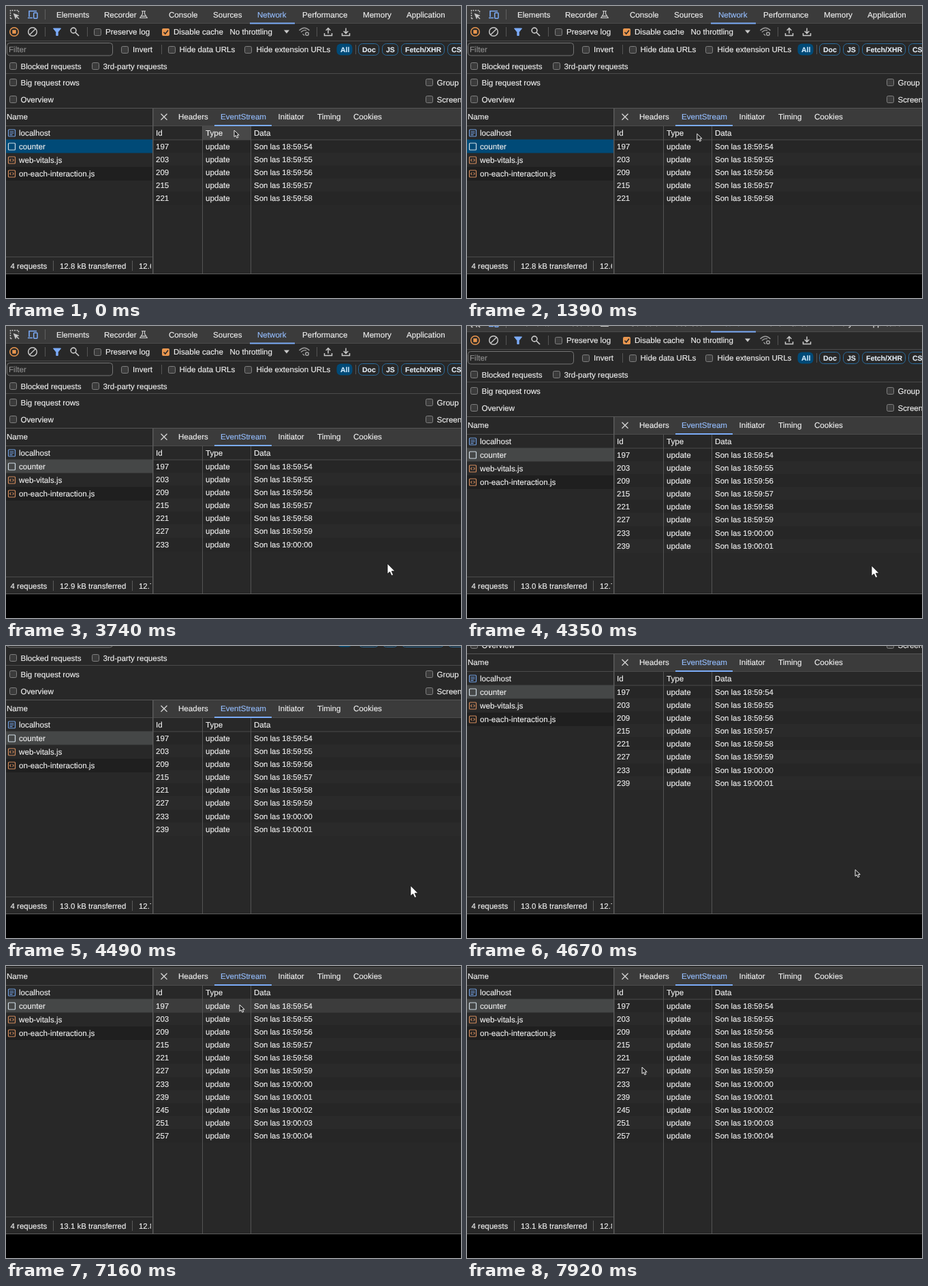
These frames come from a looping animation (668 by 430 pixels, 7990 ms). An HTML page:

```html
<!DOCTYPE html>
<html lang="en">
<head>
<meta charset="utf-8">
<title>Network event stream</title>
<style>
html, body { margin: 0; width: 100%; height: 100%; overflow: hidden; background: #000; }
svg { display: block; }
text { font-family: "Liberation Sans", Arial, sans-serif; text-rendering: geometricPrecision; white-space: pre; }
</style>
</head>
<body>
<svg id="stage" width="668" height="430" viewBox="0 0 668 430"></svg>
<script>
const LOOP = 7990;
const BG = '#282828', BAR = '#3b3b3b', LINE = '#4b4b4b', TEXT = '#efefef';
const BLUE = '#7cacf8', ACTIVE = '#93bbfa', ORANGE = '#e8964f', ICON = '#c9c9c9';
const ROW_H = 19.1, SCROLL = 148;

const rect = (x, y, w, h, fill, extra = '') =>
  `<rect x="${x}" y="${y}" width="${w}" height="${h}" fill="${fill}" ${extra}/>`;
const label = (x, mid, str, fill = TEXT, size = 11.6, extra = '') =>
  `<text x="${x}" y="${mid + 4}" fill="${fill}" stroke="${fill}" stroke-width=".15" font-size="${size}" ${extra}>${str}</text>`;
const path = (d, stroke = ICON, width = 1.3, fill = 'none') =>
  `<path d="${d}" stroke="${stroke}" stroke-width="${width}" fill="${fill}"/>`;
const hline = (x, y, w, fill = LINE) => rect(x, y, w, 1, fill);
const vline = (x, y, h, fill = LINE) => rect(x, y, 1, h, fill);

function checkbox(x, mid, str, gap = 16.5) {
  return rect(Math.floor(x) + .5, Math.floor(mid) - 4.5, 10, 10, '#3b3b3b', 'rx="2" stroke="#808080"') +
    label(x + gap, mid, str);
}

function pill(x, w, str, active) {
  const style = active ? '' : 'stroke="#2b6c9c"';
  return rect(x + .5, 55.5, w, 17, active ? '#004a77' : BG, `rx="6" ${style}`) +
    label(x + 6, 64, str, active ? '#d3ecff' : '#dfe9f2', 10.5, 'font-weight="bold"');
}

function topTabs() {
  const tabs = [[74, 'Elements'], [144, 'Recorder'], [239, 'Console'], [304, 'Sources'], [369, 'Network'],
    [435, 'Performance'], [524, 'Memory'], [588, 'Application']];
  return rect(0, 0, 668, 25, BAR) + hline(0, 25, 668) +
    tabs.map(([x, s]) => label(x, 13, s, s === 'Network' ? ACTIVE : TEXT)).join('') +
    rect(358, 24.5, 66, 2, BLUE) + vline(57, 5, 15, '#606060') +
    path('M6.5 18.5V6.5H18.5V11M6.5 18.5H10', ICON, 1.4).replace('/>', ' stroke-dasharray="2 1.5"/>') +
    path('M11 11L19 14L15.5 15.5L14 19Z', ICON, .5, ICON) + path('M15 15L19 19', ICON, 1.5) +
    path('M34 16V7.5H45M32 17.5H39', BLUE, 1.6) + rect(40.7, 10, 5.3, 8.3, 'none', `rx="1" stroke="${BLUE}" stroke-width="1.5"`) +
    path('M199 7.5H205M200.5 8V11.5L196.8 17.5H207.2L203.5 11.5V8', ICON, 1.2) + path('M199 15H205', ICON, 1.5);
}

function toolbar() {
  const tray = (x, arrow) => path(`M${x - 5.5} 40V43.5H${x + 5.5}V40M${x} 32.5V40.5${arrow}`, ICON, 1.5);
  return hline(0, 51, 668) + [57, 119, 456].map(x => vline(x, 31, 14, '#555')).join('') +
    `<circle cx="12" cy="38" r="6.3" fill="none" stroke="${ORANGE}" stroke-width="1.5"/>` + rect(9.3, 35.3, 5.4, 5.4, ORANGE) +
    `<circle cx="39" cy="38" r="6.3" fill="none" stroke="${ICON}" stroke-width="1.5"/>` + path('M34.5 42.5L43.5 33.5', ICON, 1.5) +
    path('M69.5 33H80.5L76.2 38.5V43.5H73.8V38.5Z', BLUE, 1, BLUE) +
    `<circle cx="99" cy="36" r="3.9" fill="none" stroke="${ICON}" stroke-width="1.6"/>` + path('M102 39L107 44', ICON, 1.7) +
    checkbox(129, 38, 'Preserve log', 17) +
    rect(229, 33, 11, 11, ORANGE, 'rx="2"') + path('M231.5 38.5L233.8 41L238 35.8', '#282828', 1.6) +
    label(246, 38, 'Disable cache') + label(328.5, 38, 'No throttling') +
    path('M408 35.5H416L412 40.5Z', 'none', 0, ICON) +
    path('M430.5 36Q438 28.5 445.5 36M433 38.5Q437 34.5 441 36M435.5 41L438 43.5', '#9b9b9b', 1.4) +
    '<circle cx="442" cy="41" r="2.3" fill="none" stroke="#9b9b9b" stroke-width="1.6"/>' +
    tray(473, 'M469.7 36L473 32.6L476.3 36') + tray(499, 'M495.7 37L499 40.4L502.3 37');
}

function filters() {
  return rect(1.5, 54.5, 155, 18.5, BG, 'rx="4" stroke="#747474"') + label(4, 64, 'Filter', '#8d8d8d') +
    checkbox(169, 64, 'Invert', 17) + vline(228, 57, 14, '#555') +
    checkbox(238, 64, 'Hide data URLs') + checkbox(350.5, 64, 'Hide extension URLs', 17) +
    pill(485, 23, 'All', true) + vline(513, 57, 14, '#555') +
    pill(517, 30, 'Doc') + pill(552, 23, 'JS') + pill(580, 63, 'Fetch/XHR') + pill(648, 36, 'CSS') +
    checkbox(5, 88.5, 'Blocked requests') + checkbox(126, 88.5, '3rd-party requests') + hline(0, 99, 668) +
    checkbox(5, 112.5, 'Big request rows') + checkbox(5, 137.5, 'Overview') +
    checkbox(616, 112.5, 'Group by frame') + checkbox(616, 137.5, 'Screenshots') + hline(0, 150, 668, '#555');
}

function requestList() {
  const names = ['localhost', 'counter', 'web-vitals.js', 'on-each-interaction.js'];
  const docBlue = '#6f9ddf', scriptOrange = '#d08a5c';
  const box = (mid, color) => rect(3.5, mid - 5, 10, 10, 'none', `rx="1" stroke="${color}" stroke-width="1.2"`);
  const icons = [
    m => box(m, docBlue) + path(`M5.5 ${m - 2}H11.5M5.5 ${m + .3}H11.5M5.5 ${m + 2.6}H9.5`, docBlue, 1.1),
    m => box(m, '#d0dbe4'),
    m => box(m, scriptOrange) +
      path(`M7.5 ${m - 2}L5.7 ${m}L7.5 ${m + 2}M9.5 ${m - 2}L11.3 ${m}L9.5 ${m + 2}`, scriptOrange, 1.1)
  ];
  return label(1, 163, 'Name') + hline(0, 176, 215) + rect(0, 237, 215, 20, '#1f1f1f') +
    '<rect id="selected" y="196.5" width="215" height="20"/>' +
    names.map((n, i) => icons[Math.min(i, 2)](187 + i * 20) + label(19, 187 + i * 20, n, TEXT, 11.65)).join('');
}

function streamRow(i) {
  const mid = Math.round(206.9 + i * ROW_H), s = 54 + i;
  const clock = s < 60 ? '18:59:' + s : '19:00:' + String(s - 60).padStart(2, '0');
  return `<g class="row">${rect(217, mid - 10, 451, 20, i % 2 ? '#2a2a2a' : '#262626')}` +
    label(220, mid, 197 + 6 * i, TEXT, 11.5) + label(293, mid, 'update', TEXT, 11.7) +
    label(364, mid, 'Son las ' + clock, TEXT, 11.45) + '</g>';
}

function streamPane() {
  const tabs = [[253, 'Headers'], [315, 'EventStream'], [399.5, 'Initiator'], [457, 'Timing'], [510, 'Cookies']];
  const rows = Array.from({ length: 11 }, (_, i) => streamRow(i)).join('');
  return rect(216, 151, 452, 25, BAR) + hline(216, 176, 452) +
    path('M227.5 158.8L236.5 167.8M236.5 158.8L227.5 167.8', '#d5d5d5', 1.3) +
    tabs.map(([x, s]) => label(x, 163, s, s === 'EventStream' ? ACTIVE : TEXT)).join('') +
    rect(306, 175, 84, 2, BLUE) + rect(289, 177, 71, 20, '#484848', 'id="typeHover"') +
    label(220, 187, 'Id') + label(293, 187, 'Type') + label(364, 187, 'Data') +
    rows + rect(217, 197.5, 451, ROW_H, '#fff', 'id="rowHover" opacity=".1"') +
    hline(216, 196.5, 452) + vline(288, 177, 370, '#545454') + vline(359, 177, 370, '#545454') +
    rect(215, 151, 1.5, 396, '#5a5a5a');
}

function footer() {
  return rect(0, 369, 215, 25, BG) + hline(0, 369, 215) + vline(69, 375, 15, '#5a5a5a') + vline(185, 375, 15, '#5a5a5a') +
    label(6.5, 382.5, '4 requests', TEXT, 11.5) + label(79, 382.5, '', TEXT, 11.45, 'id="sent"') +
    `<g clip-path="url(#footClip)">${label(195, 382.5, '', TEXT, 11.45, 'id="size"')}</g>`;
}

function cursors() {
  return '<g id="cursor">' +
    `<g id="small">${path('M0 0V9.6L2.3 7.6L3.9 11.2L5.8 10.4L4.2 7H7.2Z', '#eee', 1, '#222')}</g>` +
    `<g id="large">${path('M0 0V15L3.5 12L6 17.6L8.5 16.5L6.1 11H10.8Z', '#111', .7, '#fff')}</g>` +
    '<g id="busy"><circle cx="13.5" cy="-1" r="5.8" fill="#1d2f3d" stroke="#2b9de9" stroke-width="3.8"/></g>' +
    `<g id="resize">${['#111', '#fff'].map((c, i) =>
      path('M-1.3 -5V5M1.3 -5V5M-5 0H-1.5M1.5 0H5M-3.5 -2L-5.3 0L-3.5 2M3.5 -2L5.3 0L3.5 2', c, i ? 1.1 : 2.6)).join('')}</g></g>`;
}

const stage = document.getElementById('stage');
stage.innerHTML = `<defs><clipPath id="panel">${rect(0, 0, 668, 394, '#000')}</clipPath>
  <clipPath id="footClip">${rect(190, 370, 23, 24, '#000')}</clipPath></defs>
  ${rect(0, 0, 668, 430, '#000')}${rect(0, 0, 668, 394, BG)}
  <g clip-path="url(#panel)"><g id="content">${topTabs() + toolbar() + filters() + requestList() + streamPane()}</g></g>
  ${footer()}${hline(0, 394, 668, '#5c5c5c')}${cursors()}`;

const el = id => document.getElementById(id);
const [content, cursor, selected, sent, size] = ['content', 'cursor', 'selected', 'sent', 'size'].map(el);
const rows = [...document.querySelectorAll('.row')];
const show = (node, on) => node.setAttribute('visibility', on ? 'visible' : 'hidden');
const ease = p => p * p * (3 - 2 * p);
const clamp = p => Math.max(0, Math.min(1, p));

// time, x, y of the pointer tip
const track = [[0, 335, 183], [1250, 335, 183], [2010, 365.5, 239.5], [2910, 365.5, 239.5], [3670, 505, 330],
  [3740, 560, 350], [4100, 594, 353], [4540, 594, 353], [5300, 290, 54], [5700, 290, 54], [6120, 321, 50],
  [6460, 336, 63], [6740, 341, 62], [7160, 343, 57], [7590, 343, 57], [7920, 257, 149], [LOOP, 257, 149]];

function pointerAt(t) {
  const i = track.findIndex(k => k[0] > t);
  const [t0, x0, y0] = track[i - 1], [t1, x1, y1] = track[i];
  const p = ease((t - t0) / (t1 - t0));
  return [x0 + (x1 - x0) * p, y0 + (y1 - y0) * p];
}

function render(t) {
  const scroll = Math.round(SCROLL * ease(clamp((t - 4247) / 500)));
  content.setAttribute('transform', `translate(0 ${-scroll})`);
  const count = 5 + Math.max(0, Math.floor((t - 1080) / 1000));
  rows.forEach((row, i) => show(row, i < count));
  selected.setAttribute('fill', t < 3300 ? '#004a77' : '#454747');
  sent.textContent = (t < 3080 ? '12.8' : t < 4080 ? '12.9' : t < 6080 ? '13.0' : '13.1') + ' kB transferred';
  size.textContent = (t < 3080 ? '12.6' : t < 5080 ? '12.7' : '12.8') + ' kB resources';
  show(el('typeHover'), t < 1250);
  show(el('rowHover'), t >= 6000 && t < 7640);

  const [x, y] = pointerAt(t);
  cursor.setAttribute('transform', `translate(${x.toFixed(2)} ${y.toFixed(2)})`);
  const large = t >= 2010 && t < 4600, resize = t >= 5300 && t < 5700;
  show(el('large'), large);
  show(el('busy'), t >= 2010 && t < 2910);
  show(el('resize'), resize);
  show(el('small'), !large && !resize);
}

const start = performance.now();
function tick() {
  render((performance.now() - start) % LOOP);
  requestAnimationFrame(tick);
}
tick();
</script>
</body>
</html>
```
